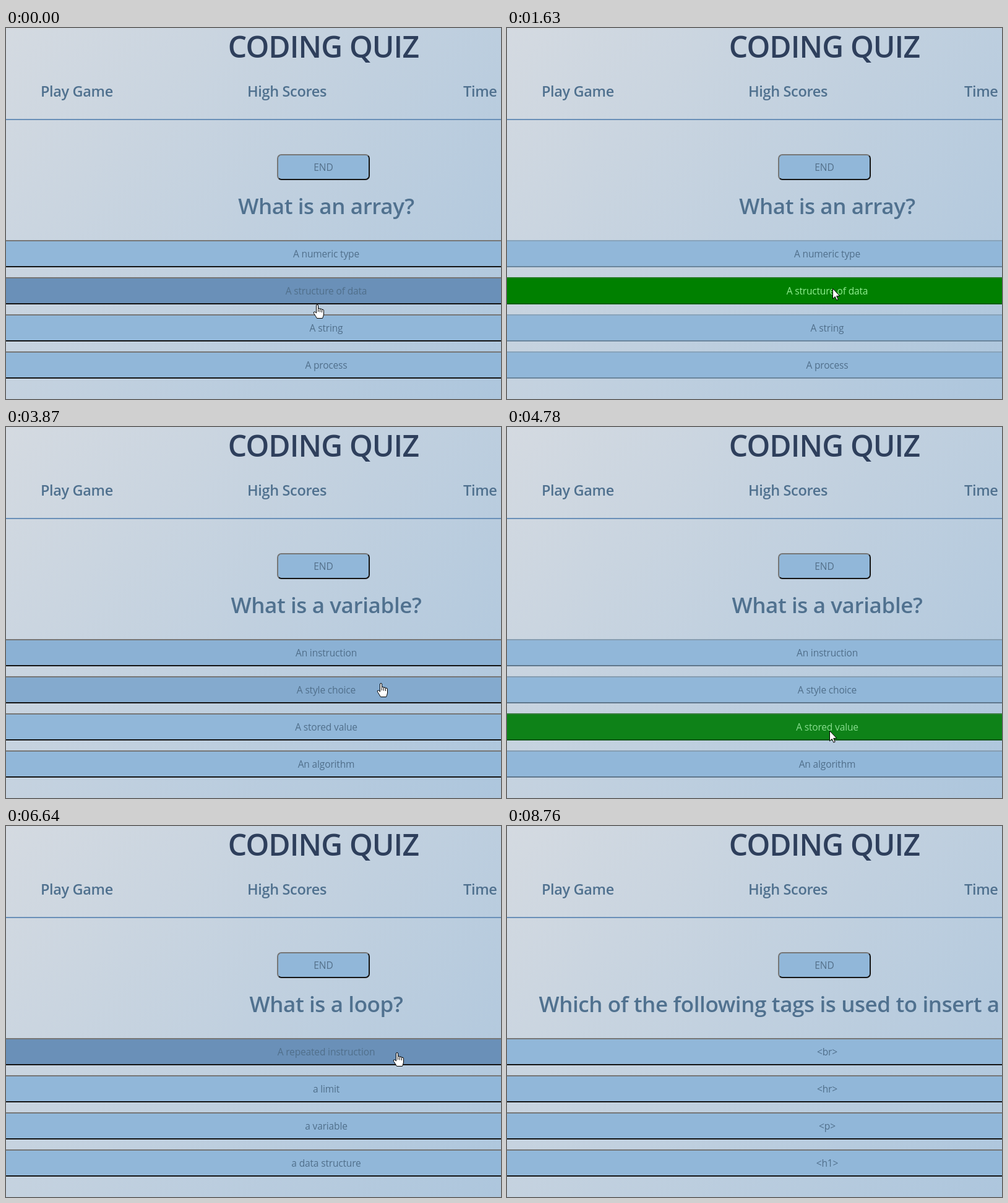
Recreate the animation shown at these times as an HTML page. Size 800 px wide and 600 px high, loop 9.13 s.

```html
<!DOCTYPE html>
<html lang="en">
<head>
<meta charset="utf-8">
<title>Coding quiz</title>
<style>
  html, body { margin: 0; width: 100%; height: 100%; overflow: hidden; }
  #stage {
    position: relative; width: 800px; height: 600px; overflow: hidden;
    background: linear-gradient(131deg, #d4dae1, #adc6dd);
    font-family: "Open Sans", "Noto Sans", sans-serif;
    font-weight: 600; color: #50718f; white-space: nowrap;
  }
  #stage > * { position: absolute; box-sizing: border-box; }
  h1, h2, nav { margin: 0; line-height: 0; font-weight: 600; }
  h1 { left: 13px; width: 1000px; top: 30px; text-align: center; font-size: 48px; letter-spacing: -.85px; color: #2e3f5c; }
  nav { top: 102px; font-size: 23.5px; letter-spacing: -.35px; }
  hr { left: 0; top: 147px; width: 800px; height: 2px; margin: 0; border: 0; background: #6a90b8; }
  h2, .row { left: -482.5px; width: 2000px; text-align: center; }
  h2 { top: 288px; font-size: 35px; letter-spacing: -.4px; }
  .end, .row { border: 2px solid; font-size: 15.5px; font-weight: 400; text-align: center; }
  .end {
    left: 438px; top: 204px; width: 150px; height: 42px; line-height: 38px; border-radius: 7px;
    background: #91b7d9; border-color: #767676 #141414 #141414 #767676; color: #54708a;
  }
  .row { height: 44px; line-height: 40px; letter-spacing: -.15px; }
  svg { left: 0; top: 0; width: 800px; height: 600px; }
  path { fill: #fff; stroke: #000; stroke-linejoin: round; }
</style>
</head>
<body>
<div id="stage">
  <h1>CODING QUIZ</h1>
  <nav style="left:56px">Play Game</nav>
  <nav style="left:390px">High Scores</nav>
  <nav style="right:6.5px">Time</nav>
  <hr>
  <div class="end">END</div>
  <h2></h2>
  <svg><path/></svg>
</div>
<script>
const LOOP = 9130, FADE = 240, HOVER_FADE = 120;
const TOP = 343, STEP = 60, HEIGHT = 44;

// Each question shows from `from` on and is answered at `click`.
const quiz = [
  { from: 0, click: 1380, verdict: 'right', text: 'What is an array?',
    answers: ['A numeric type', 'A structure of data', 'A string', 'A process'] },
  { from: 2990, click: 4640, verdict: 'right', text: 'What is a variable?',
    answers: ['An instruction', 'A style choice', 'A stored value', 'An algorithm'] },
  { from: 6210, click: 7100, verdict: 'wrong', text: 'What is a loop?',
    answers: ['A repeated instruction', 'a limit', 'a variable', 'a data structure'] },
  { from: 8700, click: Infinity, text: 'Which of the following tags is used to insert a line break?',
    answers: ['<br>', '<hr>', '<p>', '<h1>'] }
];

const blue = [145, 183, 217], ink = [80, 111, 139];
const looks = {
  idle: { back: blue, text: ink, edge: [1] },
  hover: { back: [106, 144, 184], text: ink, edge: [1] },
  off: { back: blue, text: ink, edge: [.3] },
  right: { back: [0, 128, 0], text: [144, 238, 144], edge: [.3] },
  wrong: { back: [255, 0, 0], text: [0, 0, 0], edge: [.3] }
};

// The pointer starts here, then glides: start time, duration, x, y.
const home = [503, 447];
const glides = [
  [60, 480, 515, 550], [720, 160, 526, 421], [2550, 330, 731, 301],
  [3330, 960, 521, 491], [5560, 600, 640, 552], [6190, 210, 632, 366],
  [6640, 260, 655, 425], [7160, 260, 660, 478], [7730, 360, 680, 615]
];

const ARROW = 'M.5.5V17L4.2 13.4 6.8 19.2 9.2 18.2 6.7 12.4H11.8Z';
const HAND = 'M-1.5 14V2Q-1.5.5 0 .5T1.5 2V7.5Q1.5 6.3 3 6.3T4.5 8Q4.5 7 6 7T7.5 9Q7.5 8 9 8.2' +
  'T10.5 10V16Q10 19 8.5 22.5H-.5Q-3 18-5.5 14.5Q-6.3 12.5-5 12T-1.5 14Z' +
  'M1.5 7.5V12M4.5 8V12.5M7.5 9V13';

const stage = document.getElementById('stage');
const heading = stage.querySelector('h2');
const pointer = stage.querySelector('path');
const rows = quiz[0].answers.map((_, i) => {
  const row = document.createElement('div');
  row.className = 'row';
  row.style.top = TOP + STEP * i + 'px';
  stage.insertBefore(row, stage.querySelector('svg'));
  return row;
});

const clamp = p => Math.max(0, Math.min(1, p));
const smooth = p => p * p * (3 - 2 * p);
const easeOut = p => 1 - (1 - clamp(p)) ** 2.3;
const mix = (a, b, p) => a.map((v, i) => v + (b[i] - v) * p);
const blend = (a, b, p) => ({
  back: mix(a.back, b.back, p), text: mix(a.text, b.text, p), edge: mix(a.edge, b.edge, p)
});
const rgb = c => `rgb(${c.map(Math.round)})`;

const pointerAt = t => glides.reduce(
  (pos, [at, span, ...to]) => mix(pos, to, smooth(clamp((t - at) / span))), home);

function rowUnder(t) {
  const y = pointerAt(t)[1] - TOP;
  const row = Math.floor(y / STEP);
  return y >= 0 && row < rows.length && y % STEP <= HEIGHT ? row : -1;
}

// Share of the last moments that the pointer spent over the row.
function hoverShare(row, t, from) {
  const samples = 12;
  let hits = 0;
  for (let i = 0; i < samples; i++) {
    if (rowUnder(Math.max(from, t - i * HOVER_FADE / samples)) === row) hits++;
  }
  return hits / samples;
}

function lookAt(row, q, t) {
  const before = blend(looks.idle, looks.hover, hoverShare(row, Math.min(t, q.click), q.from));
  if (t < q.click) return before;
  const after = looks[row === rowUnder(q.click) ? q.verdict : 'off'];
  return blend(before, after, easeOut((t - q.click) / FADE));
}

function draw(t) {
  const q = quiz.findLast(item => item.from <= t);
  heading.textContent = q.text;
  rows.forEach((row, i) => {
    const { back, text, edge } = lookAt(i, q, t);
    const light = `rgba(118,118,118,${edge})`, dark = `rgba(20,20,20,${edge})`;
    row.textContent = q.answers[i];
    row.style.background = rgb(back);
    row.style.color = rgb(text);
    row.style.borderColor = `${light} ${dark} ${dark} ${light}`;
  });
  pointer.setAttribute('d', t < q.click && rowUnder(t) >= 0 ? HAND : ARROW);
  pointer.setAttribute('transform', `translate(${pointerAt(t).map(Math.round)})`);
}

const start = performance.now();
function tick() {
  draw((performance.now() - start) % LOOP);
  requestAnimationFrame(tick);
}
tick();
</script>
</body>
</html>
```
